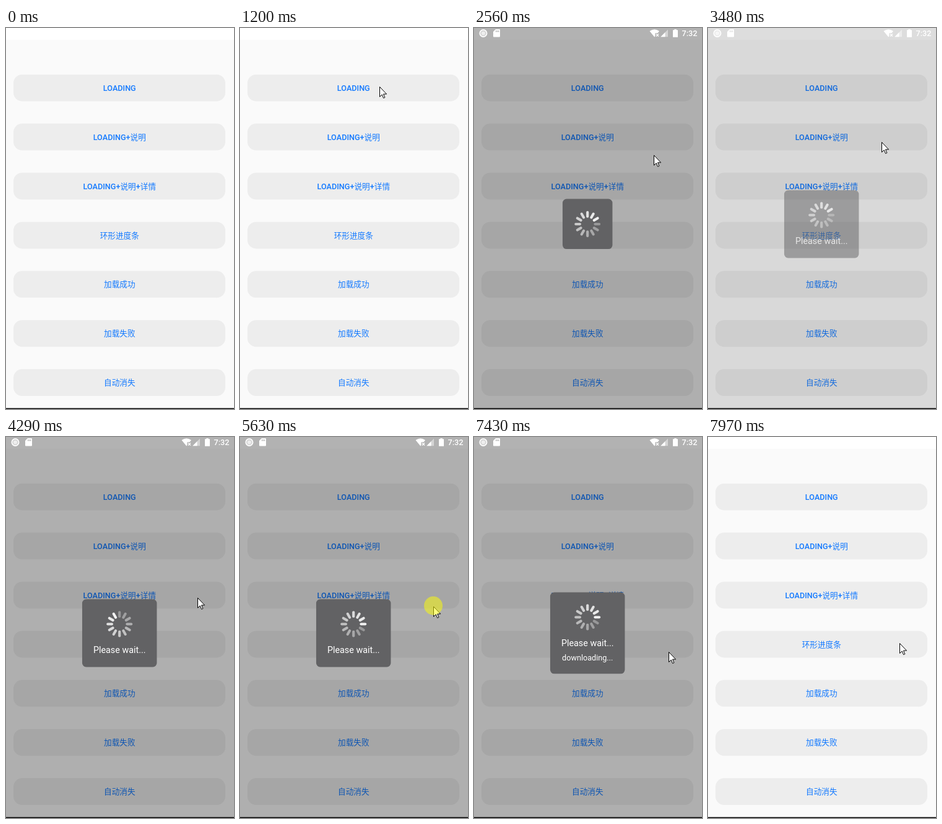
An HTML page that plays this animation: 368 by 612 pixels, repeating every 8000 ms.

```html
<!DOCTYPE html>
<html lang="zh-CN">
<head>
<meta charset="utf-8">
<title>Loading dialogs</title>
<style>
html, body { margin: 0; width: 100%; height: 100%; overflow: hidden; background: #fff; }
svg { display: block; width: 368px; height: 612px; }
text { font-family: Roboto, "Noto Sans CJK SC", "Noto Sans CJK", sans-serif; text-anchor: middle; }
.label { font-size: 12.65px; fill: #147aff; }
.latin { font-weight: 500; }
</style>
</head>
<body>
<svg id="stage" viewBox="0 0 368 612" xmlns="http://www.w3.org/2000/svg">
  <rect width="368" height="612" fill="#fff"/>
  <rect y="19" width="368" height="593" fill="#fafafa"/>
  <g id="buttons"></g>
  <rect y="610.6" width="368" height="1.4" fill="#000"/>
  <rect id="dim" width="368" height="612" fill="#000"/>
  <g id="status" fill="#fff">
    <circle cx="15" cy="8.5" r="5.6" fill="none" stroke="#fff" stroke-width="1.8"/>
    <circle cx="15" cy="8.5" r="4.7" opacity=".45"/>
    <circle cx="15" cy="8.5" r="3" opacity=".6"/>
    <path fill-rule="evenodd" d="M35 2h6q1 0 1 1v10.5q0 1-1 1h-9q-1 0-1-1V6zM35 4v2.6h1.2V4zM37 4v2.6h1.2V4zM39 4v2.6h1.2V4z"/>
    <path d="M283.5 5Q291.300 -.500 299 5L296.400 8.200H292.500V13L291.300 14.500z"/>
    <path d="M294 9.500l4 4m0-4l-4 4" stroke="#fff" stroke-width="1.300"/>
    <path d="M313 2.500v11.700h-11.700z" opacity=".45"/>
    <path d="M308.500 7v7.200h-7.200z"/>
    <path d="M323.300 2h3.400v1.300h2.300v11.400h-8V3.300h2.300z"/>
    <text x="348" y="13.200" font-size="12.6" font-weight="500">7:32</text>
  </g>
  <g id="dialogs"></g>
  <path id="cursor" d="M.5 .5V16.500L4.200 13 6.600 18.600 8.900 17.600 6.500 12.100H11.600z" fill="#fff" stroke="#000"/>
  <circle id="press" r="15" fill="#ff0" fill-opacity=".5"/>
</svg>
<script>
const LOOP = 8000, TICK = 1000 / 12;
const $ = id => document.getElementById(id);

function add(parent, tag, attrs, text) {
  const el = document.createElementNS('http://www.w3.org/2000/svg', tag);
  for (const k in attrs) el.setAttribute(k, attrs[k]);
  if (text) el.textContent = text;
  parent.appendChild(el);
  return el;
}

const labels = ['LOADING', 'LOADING+说明', 'LOADING+说明+详情', '环形进度条', '加载成功', '加载失败', '自动消失'];
labels.forEach((label, i) => {
  const y = 74.7 + 78.9 * i;
  add($('buttons'), 'rect', { x: 12, y, width: 342, height: 43, rx: 14, fill: '#ededed' });
  const text = add($('buttons'), 'text', { x: 183.3, y: y + 26.1, class: 'label' });
  for (const part of label.match(/[A-Z+]+|[^A-Z+]+/g))
    add(text, 'tspan', /[A-Z+]/.test(part) ? { class: 'latin' } : {}, part);
});

// open / close: start of each fade; spin: time of the first spinner position
const dialogs = [
  { open: 1515, close: 2865, spin: 1557, w: 80.5, y: 274.6, h: 80.5, cy: 315, lines: [] },
  { open: 3430, close: 5700, spin: 3465, w: 120.5, y: 260.5, h: 109, cy: 300.5,
    lines: [['Please wait...', 347, 14.35]] },
  { open: 6295, close: 7735, spin: 6282, w: 120.5, y: 249.5, h: 130.8, cy: 289.5,
    lines: [['Please wait...', 336, 14.35], ['downloading...', 358.7, 12.65]] }
];

for (const d of dialogs) {
  d.el = add($('dialogs'), 'g', {});
  add(d.el, 'rect', { x: 183.2 - d.w / 2, y: d.y, width: d.w, height: d.h, rx: 6.5, fill: '#626264' });
  d.bars = [];
  for (let i = 0; i < 12; i++)
    d.bars.push(add(d.el, 'rect', {
      x: -2.1, y: -21, width: 4.2, height: 10.8, rx: 2, fill: '#fff',
      transform: `translate(183.2 ${d.cy}) rotate(${i * 30})`
    }));
  for (const [text, y, size] of d.lines)
    add(d.el, 'text', { x: 183.2, y, 'font-size': size, fill: '#fff' }, text);
}

// time, x, y of the pointer tip
const path = [
  [150, 353, 596], [650, 205, 130], [830, 225, 94], [1890, 225, 94], [2540, 290, 204],
  [2865, 290, 204], [3110, 280, 183], [3600, 280, 183], [4150, 309, 258], [5120, 309, 258],
  [5500, 312, 272], [5930, 312, 272], [6050, 314, 268], [6170, 314, 268], [6340, 308, 280],
  [6780, 308, 280], [7450, 314, 345], [7740, 314, 345], [7950, 309, 331]
];
const presses = [[1310, 1420], [2740, 2850], [3140, 3260], [5590, 5690], [6060, 6170], [7615, 7720]];

const clamp = v => Math.max(0, Math.min(1, v));
const easeOut = v => 1 - (1 - clamp(v)) ** 2;

function pointer(t) {
  let i = 0;
  while (i < path.length - 2 && t > path[i + 1][0]) i++;
  const [t0, x0, y0] = path[i], [t1, x1, y1] = path[i + 1];
  const p = clamp((t - t0) / (t1 - t0)), e = p * p * (3 - 2 * p);
  return [Math.round(x0 + (x1 - x0) * e), Math.round(y0 + (y1 - y0) * e)];
}

const fade = (d, t, time) => easeOut((t - d.open) / time) * (1 - easeOut((t - d.close) / 210));

function render(t) {
  let dim = 0;
  for (const d of dialogs) {
    const alpha = fade(d, t, 170);
    d.el.style.display = alpha > 0 ? '' : 'none';
    d.el.setAttribute('opacity', alpha);
    dim = Math.max(dim, fade(d, t, 200));
    const head = 2 + Math.max(0, Math.floor((t - d.spin) / TICK));
    d.bars.forEach((bar, i) => {
      const age = (((head - i) % 12) + 12) % 12;
      bar.setAttribute('opacity', 0.92 - 0.053 * age);
    });
  }
  $('dim').setAttribute('opacity', dim * 0.3);

  const [x, y] = pointer(t);
  $('cursor').style.display = t < 150 ? 'none' : '';
  $('cursor').setAttribute('transform', `translate(${x} ${y})`);
  const pressed = presses.some(([a, b]) => t >= a && t < b);
  $('press').style.display = pressed ? '' : 'none';
  $('press').setAttribute('transform', `translate(${x} ${y - 1})`);
}

const start = performance.now();
function frame() {
  render((performance.now() - start) % LOOP);
  requestAnimationFrame(frame);
}
frame();
</script>
</body>
</html>
```
